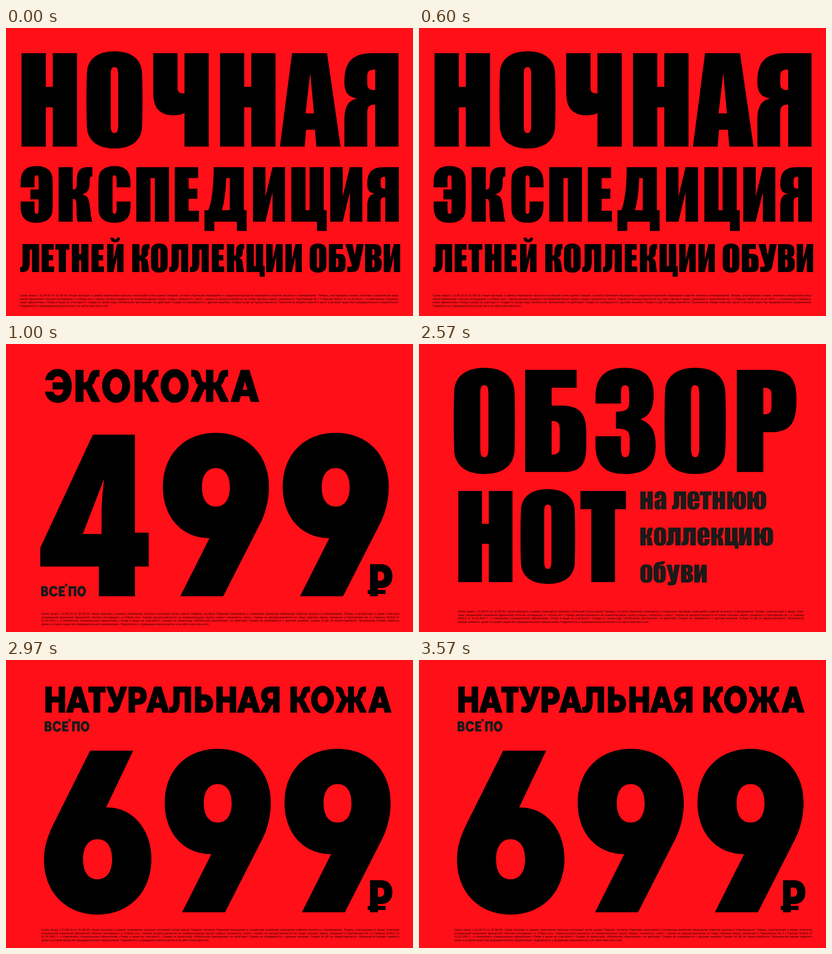
An HTML page that plays this animation: 890x629 px, repeating every 3970 ms.

```html
<!DOCTYPE html>
<html lang="ru">
<head>
<meta charset="utf-8">
<title>Летняя коллекция обуви</title>
<style>
html, body { margin: 0; width: 100%; height: 100%; overflow: hidden; background: #ff0f17; }
.scene { position: absolute; left: 0; top: 0; width: 890px; height: 629px; display: none; }
.scene.on { display: block; }
svg { position: absolute; left: 0; top: 0; }
path { fill-rule: evenodd; }
.note { position: absolute; font: 6.2px/7.6px "Liberation Sans", Arial, sans-serif; color: #1c0406; white-space: nowrap; text-rendering: geometricPrecision; }
.note div { text-align: justify; text-align-last: justify; }
.note div:last-child { text-align-last: left; }
.star { font: bold 18px "Liberation Sans", Arial, sans-serif; text-anchor: middle; }
</style>
</head>
<body>
<script>
// Condensed heavy letters: capitals are 200 units tall, lowercase 100.
const heavy = {
  Н: "M0 0H52V72H67V0H119V200H67V116H52V200H0Z",
  О: "M60 -4C98 -4 117 14 119 40Q120 60 120 100Q120 140 119 160C117 186 98 204 60 204C22 204 3 186 1 160Q0 140 0 100Q0 60 1 40C3 14 22 -4 60 -4ZM60 30C54 30 52 34 52 48V152C52 166 54 171 60 171C66 171 68 166 68 152V48C68 34 66 30 60 30Z",
  Ч: "M0 0H52V72C52 84 56 86 67 86V0H119V200H67V128C60 132 52 133 44 133C14 133 0 118 0 84Z",
  А: "M26 0H101L130 200H78L75 164H56L53 200H0ZM65 43L55 129H73Z",
  Я: "M116 0V200H66V110C54 110 49 114 49 128V200H0V144C0 112 10 100 28 97C8 94 0 84 0 62C0 22 14 0 60 0ZM66 35C52 35 49 40 49 50V64C49 76 54 79 66 79Z",
  Э: "M0 74V56C0 14 20 -4 58 -4C96 -4 115 14 117 40Q118 60 118 100Q118 140 117 160C115 186 96 204 58 204C20 204 0 186 0 144V126H51V152C51 166 53 171 59 171C65 171 66 166 66 152V118H36V82H66V48C66 34 65 30 59 30C53 30 51 34 51 48V74Z",
  К: "M0 0H52V82C66 82 67 74 67 52C67 16 76 0 108 0H124V34C116 34 114 38 114 56C114 82 108 94 86 100C108 104 112 116 116 150C118 172 120 188 124 200H70C66 188 66 170 66 150C66 124 64 116 52 116V200H0Z",
  С: "M118 74V56C118 14 98 -4 60 -4C22 -4 3 14 1 40Q0 60 0 100Q0 140 1 160C3 186 22 204 60 204C98 204 118 186 118 144V126H67V152C67 166 65 171 59 171C53 171 52 166 52 152V48C52 34 53 30 59 30C65 30 67 34 67 48V74Z",
  П: "M0 0H120V200H68V40H52V200H0Z",
  Е: "M0 0H86V40H51V79H83V116H51V160H89V200H0Z",
  Д: "M34 0H145V158H155V234H119V200H36V234H0V158H14C26 132 33 80 34 0ZM80 40H93V158H64C73 130 78 90 80 40Z",
  И: "M0 0H46V108L72 0H118V200H72V92L46 200H0Z",
  Ц: "M0 0H52V158H67V0H119V158H130V234H94V200H0Z",
  Л: "M17 0H136V200H85V40H68V128C68 180 54 200 16 200H0V165C14 165 17 162 17 140Z",
  Т: "M0 0H100V40H76V200H24V40H0Z",
  Б: "M0 0H101V35H52V70H70C108 70 120 86 120 122V150C120 186 108 200 76 200H0ZM52 100V166C64 166 68 162 68 152V116C68 104 64 100 52 100Z",
  В: "M0 0H62C104 0 117 14 117 48V58C117 80 110 90 90 93C112 98 120 110 120 138C120 186 108 200 70 200H0ZM52 35V79C65 79 68 76 68 66V48C68 38 65 35 52 35ZM52 111V166C64 166 68 163 68 153V126C68 114 64 111 52 111Z",
  У: "M0 0H52L68 80L82 0H132L104 140C96 186 84 200 44 200H14V162H34C44 162 48 160 46 148Z",
  З: "M0 66V52C0 14 20 -4 56 -4C96 -4 114 14 114 48C114 76 106 90 88 97C108 104 118 118 118 148C118 188 96 204 58 204C20 204 0 188 0 146V130H50V152C50 166 52 171 58 171C65 171 67 166 67 152V136C67 120 62 115 40 115V82C60 82 66 77 66 64V46C66 34 64 30 58 30C52 30 50 34 50 46V66Z",
  Р: "M0 0H60C104 0 117 16 117 58C117 106 104 122 66 122H52V200H0ZM52 35V87C64 87 68 84 68 72V50C68 38 64 35 52 35Z",
  н: "M0 0H30V36H40V0H70V100H40V60H30V100H0Z",
  а: "M1 38V28C1 6 12 -2 33 -2C56 -2 66 8 66 32V100H38V90C35 98 30 102 20 102C6 102 0 94 0 76V66C0 54 6 50 22 46C36 42 38 40 38 30C38 20 37 18 33.5 18C30 18 29 20 29 27V38ZM38 54C30 57 28 60 28 70C28 80 29 83 33 83C37 83 38 80 38 72Z",
  л: "M11 0H80V100H50V24H41V66C41 92 34 100 10 100H0V80C9 80 11 77 11 66Z",
  е: "M68 56H30V74C30 82 31 85 35 85C39 85 40 82 40 72V64H68V70C68 92 58 102 34 102C10 102 0 92 0 68V32C0 8 12 -2 34 -2C58 -2 68 10 68 36ZM30 42H39V28C39 18 38 15 34.5 15C31 15 30 18 30 28Z",
  т: "M0 0H66V22H48V100H18V22H0Z",
  ю: "M0 0H30V36H37V30C38 8 50 -2 71 -2C94 -2 106 10 106 32V68C106 90 94 102 71 102C50 102 38 92 37 70V60H30V100H0ZM71 15C67 15 66 18 66 26V74C66 82 67 85 71 85C75 85 76 82 76 74V26C76 18 75 15 71 15Z",
  к: "M0 0H30V40C38 40 38 36 38 26C38 8 44 0 60 0H69V18C64 18 64 22 64 30C64 42 60 47 50 50C60 52 63 58 65 74C66 86 68 94 70 100H40C38 94 38 86 38 76C38 62 36 58 30 58V100H0Z",
  о: "M34 -2C58 -2 68 10 68 32V68C68 90 58 102 34 102S0 90 0 68V32C0 10 10 -2 34 -2ZM34 15C30 15 29 18 29 26V74C29 82 30 85 34 85S39 82 39 74V26C39 18 38 15 34 15Z",
  ц: "M0 0H30V78H40V0H70V78H76V118H55V100H0Z",
  и: "M0 0H28V50L42 0H70V100H42V50L28 100H0Z",
  б: "M64 -20C64 -6 58 -2 42 0C34 1 31 4 30 10C33 6 37 4 44 4C60 4 68 14 68 36V68C68 90 58 102 34 102S0 90 0 68V26C0 -2 10 -14 34 -16C44 -17 46 -17 46 -20ZM34 22C30 22 29 25 29 32V74C29 82 30 85 34 85S39 82 39 74V32C39 25 38 22 34 22Z",
  у: "M0 0H29L38 50L46 0H75L58 90C54 112 48 116 28 116H8V96H16C24 96 26 94 25 88Z",
  в: "M0 0H36C58 0 66 8 66 26C66 40 61 46 50 48C62 50 68 58 68 72C68 92 58 100 36 100H0ZM30 18V40C37 40 38 37 38 29S37 18 30 18ZM30 58V82C37 82 39 79 39 70S37 58 30 58Z"
};
heavy.Й = heavy.И + "M24 -46H48C49 -36 54 -32 59 -32S69 -36 70 -46H94C92 -22 80 -14 59 -14S26 -22 24 -46Z";

// Wide geometric capitals, 100 units tall.
const geo = {
  О: "M0 50A44 53 0 1 0 88 50A44 53 0 1 0 0 50ZM25 50A19 27 0 1 0 63 50A19 27 0 1 0 25 50Z",
  К: "M0 0H25V39H29C36 39 38 34 41 24C46 6 52 0 68 0H75V21H71C65 21 64 25 61 34C59 41 56 45 51 48L78 100H51L32 61H25V100H0Z",
  Ж: "M49 0H72V39H76C82 39 84 34 87 24C91 6 97 0 112 0H118V21H115C109 21 108 25 105 34C103 41 100 45 96 48L121 100H95L77 61H72V100H49V61H44L26 100H0L25 48C21 45 18 41 16 34C13 25 12 21 6 21H3V0H9C24 0 30 6 34 24C37 34 39 39 45 39H49Z",
  А: "M32 0H59L90 100H63L58 82H32L27 100H0ZM38 62H52L45 36Z",
  Э: "M1 32C4 10 20 -3 41 -3C67 -3 84 18 84 50S67 103 41 103C20 103 4 90 0 68H27C29 76 34 80 41 80C50 80 56 74 58 61H24V39H58C56 27 50 20 41 20C34 20 29 24 27 32Z",
  Т: "M0 0H66V23H46V100H20V23H0Z",
  У: "M0 0H27L43 42L56 0H82L55 76C48 95 40 101 26 101C18 101 12 99 7 96L12 75C22 80 28 78 31 70Z",
  Р: "M0 0H36C58 0 70 14 70 35S58 70 36 70H25V100H0ZM25 23V47H34C41 47 45 42 45 35S41 23 34 23Z",
  Л: "M16 0H84V100H59V23H40V56C40 88 30 101 10 101C6 101 3 101 0 99V78C12 80 16 74 16 52Z",
  Ь: "M0 0H25V30H36C58 30 70 44 70 65S58 100 36 100H0ZM25 53V77H34C41 77 45 72 45 65S41 53 34 53Z",
  Н: "M0 0H25V38H51V0H76V100H51V61H25V100H0Z",
  Я: "M74 0V100H49V70H45L29 100H0L20 64C8 58 3 48 3 35C3 14 16 0 38 0ZM49 23H40C33 23 28 28 28 35S33 47 40 47H49Z",
  В: "M0 0H38C56 0 66 10 66 26C66 36 62 43 55 47C65 51 71 59 71 71C71 89 59 100 40 100H0ZM25 21V40H34C40 40 42 36 42 30S40 21 34 21ZM25 59V79H36C42 79 45 75 45 69S42 59 36 59Z",
  С: "M85 32C81 10 65 -3 44 -3C17 -3 0 18 0 50S17 103 44 103C65 103 81 90 85 68H58C56 76 51 80 44 80C32 80 25 70 25 50S32 20 44 20C51 20 56 24 58 32Z",
  Е: "M0 0H60V22H25V39H56V61H25V78H62V100H0Z",
  П: "M0 0H76V100H51V23H25V100H0Z"
};

const four = "M190 198H282V412H312V486H282V551H203V486H75V445ZM213 298L168 415H209V362Q210 335 214 298Z";
const six = "M184 198H278L219 322C276 320 318 370 318 434C318 506 270 556 200 556S83 506 83 436C83 410 90 388 102 362ZM200 391.5C222 391.5 232 410 232 435S222 479 200 479S168.5 460 168.5 435S179 391.5 200 391.5Z";
const nine = "M475 551H381L445 424C383 424 343 376 343 312C343 242 390 194 459 194S575 242 575 312C575 340 568 368 557 390ZM459 271C480 271 489.5 289 489.5 313S480 355 459 355S428.5 337 428.5 313S438 271 459 271Z";
const rouble = "M796 481H820C836 481 845 491 845 507S836 533 820 533H813V537H830V546H813V551H796V546H791V537H796ZM813 497V517H819C824 517 827 513 827 507S824 497 819 497Z";

const ink = "#1a1a18";

const shape = (d, x = 0, y = 0, s = 1) =>
  `<path transform="translate(${x} ${y}) scale(${s})" d="${d}"/>`;

const word = (font, text, xs, y, s, fill = "#000") =>
  `<g role="img" aria-label="${text}" fill="${fill}">` +
  [...text].map((c, i) => shape(font[c], xs[i], y, s)).join("") + "</g>";

// The six starts 4 units further right, so its nines follow along.
const price = (first, dx) =>
  shape(first) + shape(nine, dx) + shape(nine, dx + 262) + shape(rouble);

const allFor = (x, y) =>
  word(geo, "ВСЕПО", [0, 17.5, 38.5, 60, 78.7].map(d => x + d), y, .22, ink) +
  `<text class="star" x="${x + 54.5}" y="${y + 6.5}" fill="${ink}">*</text>`;

// Each of @ # ^ marks the line ends of one layout; inside a word it adds a hyphen.
const terms = "Сроки акции с 21.08.15 по 31.08.15г. Акция проходит в рамках переоценки прошлых коллекций путем уценки Товаров, " +
  "согласно Приказам переоценки и созданным журналам переоценки отделом анализа и планирования. Товары, участвующие в акции, " +
  "отме^чены #специальной акци@онной афишеткой «Ночная экспедиция» и «Обзор нот». Уценка распространяется на номенклатурную группу " +
  "«обувь» сезонность «лето». Уценка не распространяется на товар торговых марок, указанных в Приложении № 1 к Приказу ^№81/2 от " +
  "#31.01.2015 г., и помеченных специаль@ными афишетками «Товар в акции не участвует!». Скидка по промо-коду «Мобильное приложение» " +
  "не действует. Скидки не суммируются с другими акциями. Скидка по ДК не предоставляется. Организатор ^вправе изменять #сроки и " +
  "условия акции без предварительного уведомления. @Подробность у продавцов-консультантов и на сайте www.obuv.com.";

function note(mark, left, right, top) {
  const plain = [...terms].filter(c => c === mark || !"@#^".includes(c)).join("");
  const lines = plain.split(mark).map((l, i, all) =>
    l.endsWith(" ") || i === all.length - 1 ? l.trim() : l + "-");
  return `<div class="note" style="left:${left}px;top:${top}px;width:${right - left}px">` +
    lines.map(l => `<div>${l}</div>`).join("") + "</div>";
}

const scenes = [
  { at: 0,
    art: word(heavy, "НОЧНАЯ", [34, 176, 322, 468, 599, 740], 55, 1.02) +
      word(heavy, "ЭКСПЕДИЦИЯ", [32, 115, 202, 285, 369, 434, 540, 624, 709, 790], 304, .595) +
      word(heavy, "ЛЕТНЕЙ", [31, 78, 108, 144, 187, 221], 472, .305) +
      word(heavy, "КОЛЛЕКЦИИ", [276, 317, 357, 402, 450, 483, 526, 569, 611], 472, .305) +
      word(heavy, "ОБУВИ", [664, 706, 742, 785, 826], 472, .305),
    note: note("@", 30, 859, 581.2) },
  { at: 1000,
    art: word(geo, "ЭКОКОЖА", [85, 152, 210, 281, 338, 403, 491], 56.5, .7) +
      price(four, 0) + allFor(77, 529),
    note: note("#", 77, 860, 586.2) },
  { at: 1970,
    art: word(heavy, "ОБЗОР", [76, 232, 386, 537, 695], 56.5, 1.115) +
      word(heavy, "НОТ", [86, 222, 353], 321, .995) +
      word(heavy, "на", [484, 515], 322, .39, ink) +
      word(heavy, "летнюю", [553, 587, 614, 642, 674, 718], 322, .39, ink) +
      word(heavy, "коллекцию", [484, 514, 541, 574, 609, 639, 669, 700, 733], 401, .39, ink) +
      word(heavy, "обуви", [484, 513, 541, 573, 602], 482, .39, ink),
    note: note("^", 85, 842, 581.2) },
  { at: 2970,
    art: word(geo, "НАТУРАЛЬНАЯ", [86, 131, 180, 218.5, 268, 306, 357, 413, 460, 505, 556], 58, .57) +
      word(geo, "КОЖА", [622, 667, 720, 792], 58, .57) +
      allFor(84.5, 134) + price(six, 4),
    note: note("#", 77, 860, 586.2) }
];
const loop = 3970;

for (const s of scenes) {
  s.el = document.createElement("div");
  s.el.className = "scene";
  s.el.innerHTML = `<svg width="890" height="629" viewBox="0 0 890 629">${s.art}</svg>${s.note}`;
  document.body.append(s.el);
}

const start = performance.now();
function draw() {
  const t = (performance.now() - start) % loop;
  const now = scenes.findLast(s => t >= s.at);
  for (const s of scenes) s.el.classList.toggle("on", s === now);
  requestAnimationFrame(draw);
}
draw();
</script>
</body>
</html>
```
